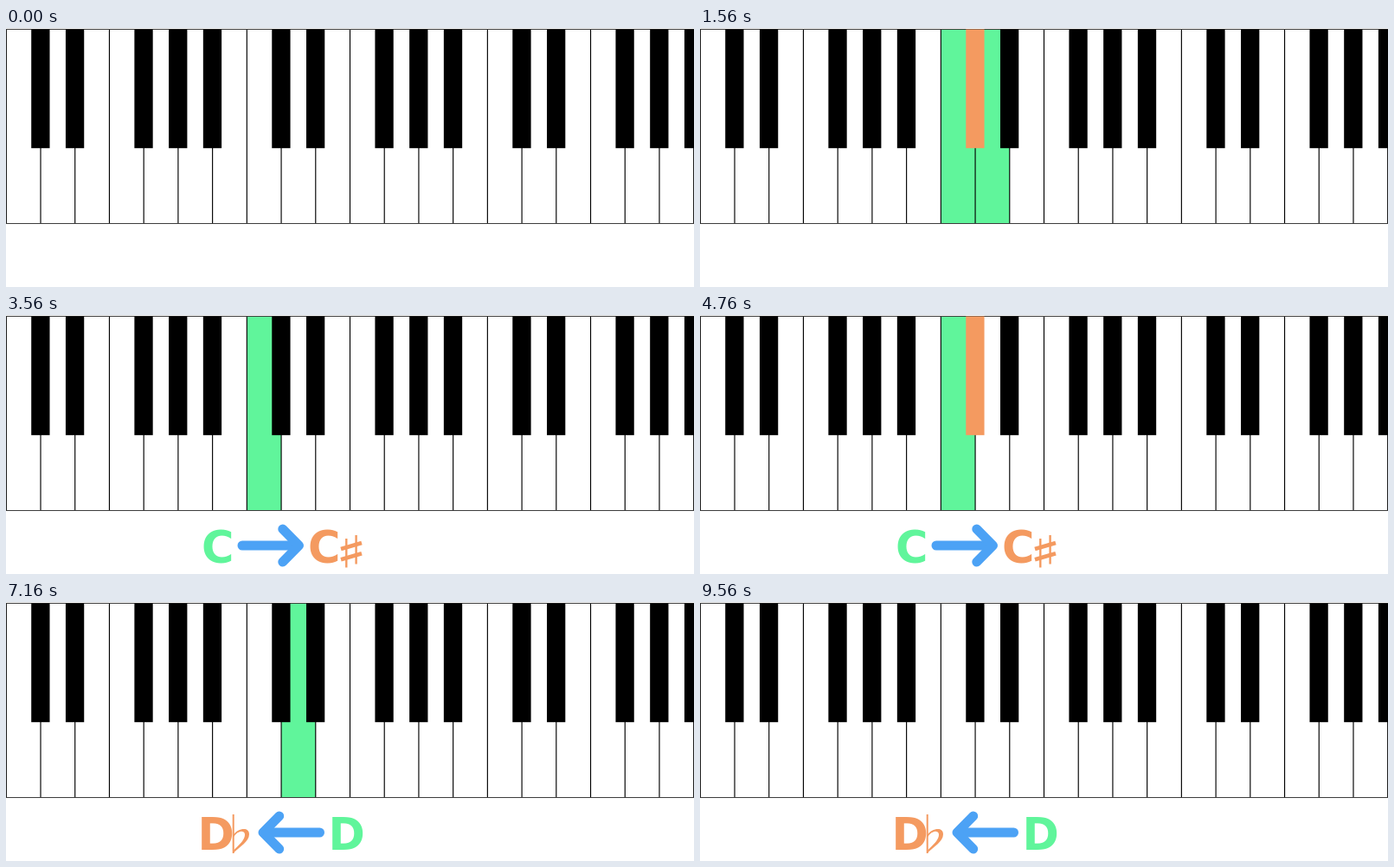
An HTML page with a canvas that plays this animation: 795x300 px, repeating every 9.6 s.

```html
<!DOCTYPE html>
<html lang="en">
<head>
<meta charset="utf-8">
<title>Sharps and flats</title>
<style>
  html, body { margin: 0; width: 100%; height: 100%; overflow: hidden; background: #fff; }
  canvas { display: block; }
</style>
</head>
<body>
<canvas id="stage" width="795" height="300"></canvas>
<script>
const ctx = document.getElementById('stage').getContext('2d');
const GREEN = '#60f59b', ORANGE = '#f49a60', BLUE = '#4ca2f5';
const LOOP = 9600, KEYS = 20, TOP = 1.5, BOTTOM = 226.5;

// start time, lit keys (C, D: white keys, s: black key between them), caption
const steps = [
  [0, '', ''], [360, 's', ''], [760, 'Cs', ''], [1160, 'sD', ''], [1560, 'CsD', ''],
  [2360, 'C', 'sharp'], [2760, 'Cs', 'sharp'], [3160, 's', 'sharp'], [3560, 'C', 'sharp'],
  [3960, 'Cs', 'sharp'], [4360, 's', 'sharp'], [4760, 'Cs', 'sharp'],
  [5960, 'D', 'flat'], [6360, 'sD', 'flat'], [6760, 's', 'flat'], [7160, 'D', 'flat'],
  [7560, 'sD', 'flat'], [7960, 's', 'flat'], [8360, 'sD', 'flat'], [9560, '', 'flat']
];

const keyX = k => 0.3 + k * 39.72;

function line(points, color, width) {
  ctx.beginPath();
  points.forEach(([x, y]) => ctx.lineTo(x, y));
  ctx.strokeStyle = color;
  ctx.lineWidth = width;
  ctx.stroke();
}

function keyboard(lit) {
  ctx.fillStyle = GREEN;
  [['C', 7], ['D', 8]].forEach(([name, k]) => {
    if (lit.includes(name)) ctx.fillRect(keyX(k), TOP, 39.72, BOTTOM - TOP);
  });
  for (let k = 0; k <= KEYS; k++) line([[keyX(k), TOP], [keyX(k), BOTTOM]], '#000', 1.15);
  for (const y of [TOP, BOTTOM]) line([[0, y], [795, y]], '#3c3c3c', 1);
  for (let k = 1; k <= KEYS; k++) {
    if (k % 7 === 0 || k % 7 === 3) continue;
    ctx.fillStyle = k === 8 && lit.includes('s') ? ORANGE : '#000';
    ctx.fillRect(keyX(k) - 10.8, TOP, 21.3, 139.2 - TOP);
  }
}

function letter(text, x, color) {
  ctx.font = 'bold 51px "DejaVu Sans", Verdana, sans-serif';
  ctx.fillStyle = color;
  ctx.fillText(text, x, 287);
}

function arrow(flip) {
  const at = (x, y) => [flip ? 635.5 - x : x, y];
  ctx.lineCap = ctx.lineJoin = 'round';
  line([at(273, 267), at(337, 267)], BLUE, 11);
  line([at(319.8, 248), at(338.5, 267), at(319.8, 286)], BLUE, 11);
  ctx.lineCap = 'butt';
  ctx.lineJoin = 'miter';
}

function sharpSign() {
  line([[393.3, 259], [393.3, 292.5]], ORANGE, 2.4);
  line([[404.6, 255], [404.6, 288.5]], ORANGE, 2.4);
  for (const y of [271, 283.3]) line([[387, y], [411, y - 7]], ORANGE, 4.6);
}

function flatSign() {
  line([[262.7, 246], [262.7, 291]], ORANGE, 2);
  ctx.fillStyle = ORANGE;
  ctx.beginPath();
  ctx.moveTo(262.5, 270);
  ctx.bezierCurveTo(268, 262, 281, 260, 281, 269);
  ctx.bezierCurveTo(281, 278, 270, 283, 262, 291.5);
  ctx.lineTo(263.5, 287);
  ctx.bezierCurveTo(271, 280, 276, 275, 276, 269.5);
  ctx.bezierCurveTo(276, 263.5, 267, 265, 263.5, 272);
  ctx.fill();
}

function caption(kind) {
  if (kind === 'sharp') {
    letter('C', 226, GREEN);
    arrow(false);
    letter('C', 349, ORANGE);
    sharpSign();
  } else if (kind === 'flat') {
    letter('D', 221.4, ORANGE);
    flatSign();
    arrow(true);
    letter('D', 372.4, GREEN);
  }
}

const start = performance.now();

function draw() {
  const t = (performance.now() - start) % LOOP;
  const [, lit, kind] = steps.filter(s => s[0] <= t).pop();
  ctx.fillStyle = '#fff';
  ctx.fillRect(0, 0, 795, 300);
  keyboard(lit);
  caption(kind);
  requestAnimationFrame(draw);
}
draw();
</script>
</body>
</html>
```
